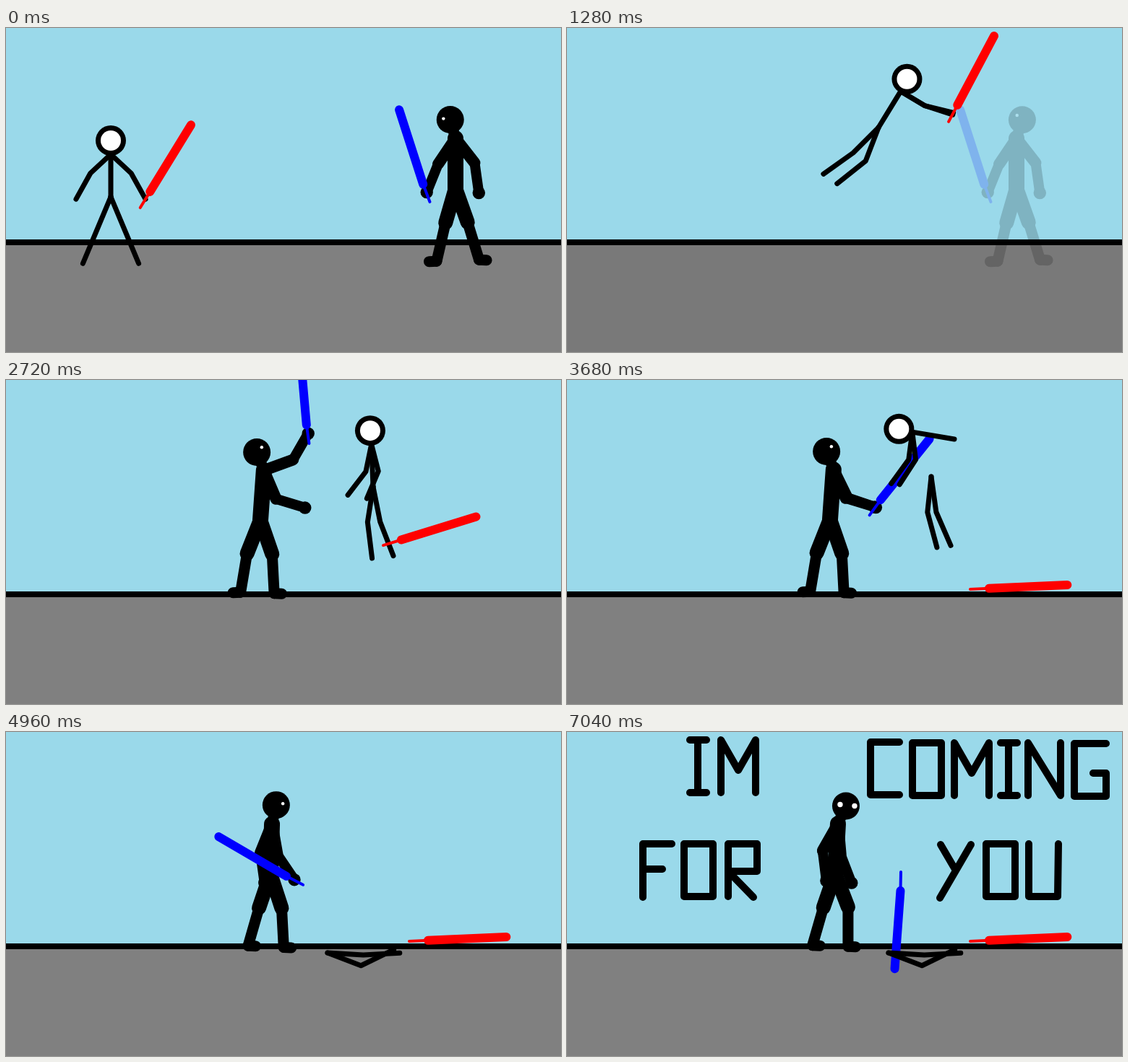
Animation, 768 px wide and 449 px high, one loop 7.6 s. Source, as an HTML page with a canvas:

```html
<!DOCTYPE html>
<html lang="en">
<head>
<meta charset="utf-8">
<title>Stick duel</title>
<style>
html, body { margin: 0; width: 100%; height: 100%; overflow: hidden; background: #808080; }
canvas { display: block; width: 768px; height: 449px; }
</style>
</head>
<body>
<canvas id="stage" width="768" height="449"></canvas>
<script>
const W = 768, H = 449, LOOP = 7600, STEP = 80;
const CUT = 3360, PLANT = 5680, TURN = 6800, END = 7040;
const stage = document.getElementById('stage').getContext('2d');
const layer = document.createElement('canvas');
layer.width = W;
layer.height = H;
const ghost = layer.getContext('2d');

const clamp = v => Math.max(0, Math.min(1, v));
const span = (t, from, to) => clamp((t - from) / (to - from));
const polar = ([x, y], deg, r) => {
  const a = deg * Math.PI / 180;
  return [x + Math.cos(a) * r, y + Math.sin(a) * r];
};

// Blends numbers, arrays and poses alike.
function mix(a, b, u) {
  if (typeof a === 'number') return a + (b - a) * u;
  if (Array.isArray(a)) return a.map((v, i) => mix(v, b[i], u));
  return Object.fromEntries(Object.keys(a).map(k => [k, mix(a[k], b[k], u)]));
}

function poseAt(keys, t) {
  const i = keys.findIndex(k => k[0] > t);
  if (i < 0) return keys[keys.length - 1][1];
  if (i === 0) return keys[0][1];
  const [t0, a] = keys[i - 1], [t1, b] = keys[i];
  return mix(a, b, span(t, t0, t1));
}

// A pose is the hip and the angle of each bone, clockwise from the right.
const guard = {
  hip: [622, 222], torso: -90, head: -105.6, armA: [124, 112], armB: [52, 82],
  legA: [106, 103], legB: [70.5, 73], saber: -107.8
};
const lunge = {
  hip: [186, 212], torso: -37, head: -58, armA: [132, 64], armB: [165, 119],
  legA: [95, 129], legB: [50, 85], saber: 337.2
};
const slash = {
  hip: [364, 193], torso: -86, head: -111, armA: [64, 19], armB: [67, 17],
  legA: [111.6, 99.5], legB: [71, 87], saber: 308.7
};
const rest = {
  hip: [366, 196.5], torso: -88.3, head: -77.6, armA: [80, 56], armB: [112, 82],
  legA: [108.6, 106], legB: [72, 87], saber: 570.3
};
const plant = {
  hip: [368, 203], torso: -58, head: -40, armA: [43, 51], armB: [150, 140],
  legA: [112, 112], legB: [66, 84], saber: 814.2
};
const calm = {
  hip: [371, 196], torso: -86.7, head: -57.8, armA: [85, 69], armB: [119.5, 83],
  legA: [109, 106], legB: [69, 90], saber: plant.saber
};
const wait = { ...rest, hip: [112, 216], saber: rest.saber - 360 };
const raise = { ...slash, hip: [352, 194], armA: [-20, -60], saber: 265 };
const stab = { ...slash, armA: [30, 0], saber: 339 };
const darkKeys = [
  [160, guard], [1280, { ...guard, head: -73 }], [1360, wait], [1760, wait],
  [2160, lunge], [2720, raise], [2880, stab], [CUT, stab], [3680, slash],
  [4160, { ...slash, saber: 285 }], [4960, rest], [PLANT, plant], [5840, plant],
  [6160, calm], [TURN, calm], [END, { ...calm, head: -66 }]
];

const ready = {
  hip: [145, 234], torso: -90, head: -90, armA: [43, 61], armB: [137, 119],
  legA: [112.7, 112.7], legB: [67.3, 67.3], saber: -58.5
};
const leap = {
  hip: [431, 138], torso: -58.5, head: -63, armA: [31, 14], armB: [31, 18],
  legA: [135, 144.5], legB: [111, 141.5], saber: -62.1
};
const stand = {
  hip: [522, 197], torso: -86, head: -86, armA: [50, 77], armB: [116, 132],
  legA: [109, 110.6], legB: [67, 77], saber: -68
};
const limp = {
  hip: [504, 134], torso: -94, head: -98, armA: [83, 123], armB: [97.5, 126],
  legA: [96, 75], legB: [82, 66.5], saber: -2.6
};
const land = { ...stand, hip: [542, 212], saber: -20 };
const fallen = { ...limp, hip: [445, 306], legA: [21, -26], legB: [3.6, -3.3] };
const lightKeys = [
  [160, ready], [1280, leap], [1600, land], [1760, land], [2160, stand],
  [2880, limp], [3680, limp], [4080, fallen]
];

function limb(root, angles, upper, lower) {
  const joint = polar(root, angles[0], upper);
  return [root, joint, polar(joint, angles[1], lower)];
}

function line(c, width, ...pts) {
  c.lineWidth = width;
  c.beginPath();
  pts.forEach(p => c.lineTo(...p));
  c.stroke();
}

function dot(c, [x, y], r, color) {
  c.fillStyle = color;
  c.beginPath();
  c.arc(x, y, r, 0, Math.PI * 2);
  c.fill();
}

function ink(c, color) {
  c.strokeStyle = color;
  c.lineCap = c.lineJoin = 'round';
}

function drawSaber(c, pommel, deg, color, bend) {
  const guardEnd = polar(pommel, deg + bend, 26);
  ink(c, color);
  line(c, 4, pommel, guardEnd);
  line(c, 12, guardEnd, polar(guardEnd, deg, 108.5));
}

const pommelIn = (hand, deg) => polar(hand, deg + 180, 14);

function drawDark(c, t) {
  const p = poseAt(darkKeys, t);
  const neck = polar(p.hip, p.torso, 69), head = polar(neck, p.head, 27);
  const arms = [p.armA, p.armB].map(a => limb(neck, a, 43, 42));
  const legs = [p.legA, p.legB].map(a => limb(p.hip, a, 50, 54.5));

  ink(c, '#000');
  legs.forEach(([hip, knee, heel], i) => {
    // The rear foot points forward only when its shin leans well back.
    const side = i === 1 || p.legA[1] > 104.5 ? 1 : -1;
    line(c, 20, hip, knee);
    line(c, 15, knee, heel);
    line(c, 15, heel, [heel[0] + 10.5 * side, heel[1] + 0.5]);
  });
  line(c, 22, neck, p.hip);
  line(c, 15, head, neck);
  for (const [shoulder, elbow, hand] of arms) {
    line(c, 16, shoulder, elbow);
    line(c, 14, elbow, hand);
    dot(c, hand, 8.7, '#000');
  }

  dot(c, head, 19, '#000');
  const turn = span(t, TURN, END), facing = t < 1344 ? -1 : 1;
  const eye = polar(head, p.head + 66 * facing, 9.5 + 2.5 * turn);
  dot(c, eye, 2.2 + 1.5 * turn, '#fff');
  if (turn > 0.5) dot(c, [head[0] - 14 + 6 * turn, head[1] - 2], 3.7, '#fff');

  const pommel = t < PLANT ? pommelIn(arms[0][2], p.saber) : [462, 194];
  drawSaber(c, pommel, p.saber, '#00f', -3);
}

function drawLight(c, t) {
  const p = poseAt(lightKeys, t);
  p.hip = [p.hip[0], p.hip[1] - 50 * Math.sin(Math.PI * span(t, 160, 1280))];

  // Once cut, the upper half spins away with growing speed.
  const cut = Math.max(0, (t - CUT) / 320);
  const waist = cut ? [limp.hip[0] + 32 * cut ** 3, limp.hip[1] - 52 * cut] : p.hip;
  const spin = -76.4 * cut;
  const neck = polar(waist, p.torso + spin, 59);
  const head = polar(neck, p.head + spin * 0.9, 19);
  const [armA, armB] = [p.armA, p.armB].map(a => limb(neck, a, 38.5, 41));

  ink(c, '#000');
  for (const leg of [p.legA, p.legB]) line(c, 7, ...limb(p.hip, leg, 49.5, 50.5));
  line(c, 7, waist, neck);
  line(c, 7, ...armA);
  line(c, 7, ...armB);
  dot(c, head, 21, '#000');
  dot(c, head, 14, '#fff');

  const pommel = mix(pommelIn(armA[2], p.saber), [558, 290], span(t, 2560, 2880));
  drawSaber(c, pommel, p.saber, '#f00', 0);
}

const glyphs = {
  I: 'M0,0 23,0M11,0 11,73M0,73 23,73',
  M: 'M0,73 0,0 24,42 48,0 48,73',
  C: 'M40,0 0,0 0,73 40,73',
  O: 'M0,0 40,0 40,73 0,73Z',
  N: 'M0,73 0,0 45,73 45,0',
  G: 'M44,0 0,0 0,73 44,73 44,41 26,41',
  F: 'M0,74 0,0 40,0M0,35 27,35',
  R: 'M0,73 0,0 40,0 40,38 0,38 35,74',
  Y: 'M0,1 21,37M42,1 -1,75',
  U: 'M0,0 0,73 40,73 41,0'
};
const message = 'I170,11 M213,11 C420,14 O478,15 M536,15 I600,15 N638,15 G702,16 ' +
  'F105,155 O162,155 R223,155 Y517,155 O580,155 U639,155';

function drawMessage(c) {
  ink(c, '#000');
  c.lineWidth = 10;
  for (const item of message.split(' ')) {
    c.save();
    c.translate(...item.slice(1).split(',').map(Number));
    c.stroke(new Path2D(glyphs[item[0]]));
    c.restore();
  }
}

function draw(t) {
  const c = stage;
  const alpha = t < 1344 ? 1 - span(t, 960, 1344) : span(t, 1344, 1664);
  c.fillStyle = '#9ad9ea';
  c.fillRect(0, 0, W, 297);
  c.fillStyle = alpha < 1 ? '#797979' : '#808080';
  c.fillRect(0, 297, W, H - 297);
  c.fillStyle = '#000';
  c.fillRect(0, 293, W, 8);

  ghost.clearRect(0, 0, W, H);
  drawDark(ghost, t);
  c.globalAlpha = alpha;
  c.drawImage(layer, 0, 0);
  c.globalAlpha = 1;

  drawLight(c, t);
  if (t >= END) drawMessage(c);
}

const start = performance.now();
function tick() {
  const t = (performance.now() - start) % LOOP;
  draw(Math.floor(t / STEP) * STEP);
  requestAnimationFrame(tick);
}
tick();
</script>
</body>
</html>
```
